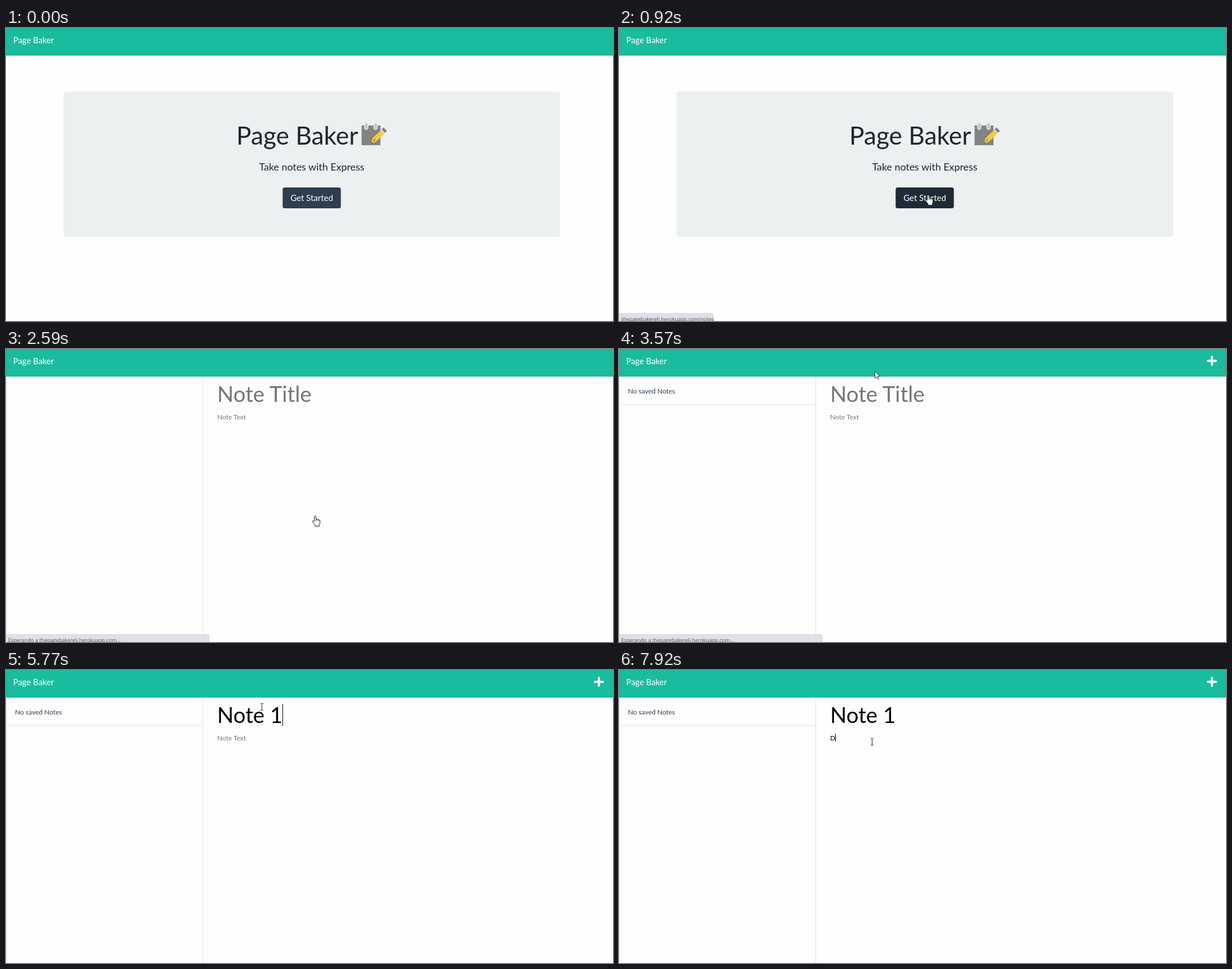
Write an HTML page that moves like this. It is 1078x520 px and loops after 7990 ms.

```html
<!DOCTYPE html>
<html lang="en">
<head>
<meta charset="utf-8">
<title>Page Baker</title>
<style>
html, body { margin: 0; width: 100%; height: 100%; overflow: hidden; background: #fefefe; }
svg { display: block; width: 100vw; height: 100vh; font-family: Lato, sans-serif; }
text { white-space: pre; }
#status text { font: 9.1px "Open Sans", "Noto Sans", sans-serif; }
</style>
</head>
<body>
<svg viewBox="0 0 1078 520" xmlns="http://www.w3.org/2000/svg">
  <rect width="1078" height="520" fill="#fefefe"/>
  <rect width="1078" height="49" fill="#1abc9e"/>
  <text x="12.800" y="27" font-size="14.800" fill="#fff">Page Baker</text>
  <path id="plus" d="M1053 14V28M1046 21H1060" stroke="#f3fbf9" stroke-width="4" stroke-linecap="round"/>

  <g id="home">
    <rect x="102" y="113" width="882" height="257.500" rx="4" fill="#ecf0f1"/>
    <text x="409" y="207" font-size="44.300" fill="#212529">Page Baker</text>
    <g id="pad">
      <rect x="631.500" y="173" width="33.500" height="35" fill="#838383"/>
      <g fill="#c4c9c2" stroke="#ecf0f1" stroke-width="1">
        <rect x="636.500" y="168.500" width="6.500" height="12" rx="3.200"/>
        <rect x="653" y="168.500" width="6.500" height="12" rx="3.200"/>
      </g>
      <path d="M648 205L651 195.500L666 181L672 187L657.500 201.500Z" fill="#fcc836"/>
      <path d="M667 180L670.500 176.500L676.500 182.500L673 186Z" fill="#7f8487"/>
      <path d="M652 200.800L655.500 197.300" stroke="#6d6440" stroke-width="1.200"/>
      <path d="M648 205L649 202L651 204Z" fill="#555"/>
    </g>
    <text x="543" y="253.300" font-size="17.850" fill="#212529" text-anchor="middle">Take notes with Express</text>
    <rect id="ring" x="490" y="282" width="106" height="39" rx="5" fill="none" stroke="#4c5b6a" stroke-opacity=".6"/>
    <rect id="button" x="491.300" y="283" width="103.400" height="37" rx="3.840"/>
    <text x="543" y="307" font-size="15" fill="#fff" text-anchor="middle">Get Started</text>
  </g>

  <g id="notes">
    <path d="M.5 49V520M349.500 49V520" stroke="#dfdfdf"/>
    <g id="list">
      <text x="16" y="79" font-size="12" fill="#2c3e50">No saved Notes</text>
      <path d="M2 98.500H348.500" stroke="#dfdfdf"/>
    </g>
    <text id="title" x="375" y="94" font-size="38.400"></text>
    <text id="body" x="375" y="125" font-size="12"></text>
    <rect id="caret" width="1"/>
  </g>

  <g id="status">
    <path id="bar" fill="#dee1e6" stroke="#cfd2d7" stroke-width=".6"/>
    <text id="link" x="4" y="519.500" fill="#4b4f54"></text>
  </g>

  <g id="arrow" fill="#fff" stroke="#000" stroke-width=".8">
    <path d="M.5 .5V13L3.400 10.300L5.300 14.600L7.300 13.700L5.400 9.500H9.400Z"/>
  </g>
  <g id="hand" fill="#fff" stroke="#111820" stroke-width="1" stroke-linejoin="round">
    <path d="M-1.500 8.500V.8Q-1.500 -.7 0 -.7T1.500 .8V5.600Q1.700 4.500 2.900 4.600T4.100 6Q4.500 5.200 5.500 5.300T6.600 6.700Q7 6 7.900 6.300T8.700 7.800V11Q8.700 13.500 7.200 15.200V17.400H-.2V15.500L-4 10.300Q-5.200 8.600 -4 7.900T-1.500 9.300"/>
    <path d="M1.500 5.600V8.500M4.100 6V8.500M6.600 6.700V8.700" fill="none" stroke-width=".8"/>
  </g>
  <path id="beam" d="M-2.500 -6H-.7L0 -5.500L.7 -6H2.500M0 -5.500V5.500M-2.500 6H-.7L0 5.500L.7 6H2.500" fill="none" stroke="#222" stroke-width="1"/>
</svg>
<script>
const LOOP = 7990;
const $ = id => document.getElementById(id);
const show = (id, on) => $(id).setAttribute('visibility', on ? 'visible' : 'hidden');
const set = (id, attrs) => { for (const k in attrs) $(id).setAttribute(k, attrs[k]); };
const ramp = (t, from, length) => Math.min(1, Math.max(0, (t - from) / length));
const within = (t, from, to) => t >= from && t < to;
const latest = (list, t) => list.filter(item => item[0] <= t).pop();

// time, pointer shape, hot spot
const pointer = [
  [0, ''], [70, 'arrow', 945, 482], [160, 'arrow', 800, 415], [250, 'arrow', 713, 363],
  [520, 'arrow', 692, 356], [590, 'arrow', 648, 337], [650, 'arrow', 606, 320],
  [720, 'hand', 573, 308], [790, 'hand', 556, 300], [850, 'hand', 549, 297],
  [3170, 'arrow', 498, 190], [3240, 'arrow', 464, 82], [3310, 'arrow', 454, 39],
  [3640, 'arrow', 454, 42], [3710, 'arrow', 454, 46], [3780, 'beam', 454.5, 56],
  [3840, 'beam', 454.5, 62], [3910, 'beam', 454.5, 65.5],
  [6620, 'beam', 454.5, 69], [6700, 'beam', 453.5, 82], [6770, 'beam', 452.5, 99],
  [6840, 'beam', 450.5, 114], [6910, 'beam', 449.5, 123], [6980, 'beam', 449.5, 127.5]
];
const titles = [[0, ''], [4990, 'N'], [5210, 'No'], [5480, 'Not'], [5550, 'Note'], [5620, 'Note '], [5770, 'Note 1']];
const host = 'thepagebakereli.herokuapp.com';
const statuses = [[0, ''], [850, host + '/notes', 168], [1700, 'Esperando a ' + host + '...', 361], [3640, '']];

function field(id, value, hint) {
  $(id).textContent = value || hint;
  set(id, { fill: value ? '#000' : '#757575' });
  return 375 + (value ? $(id).getComputedTextLength() : 0);
}

function draw(t) {
  const onNotes = t >= 2590;
  show('home', !onNotes);
  show('notes', onNotes);
  show('list', t >= 3170);
  show('plus', t >= 2770);

  const dark = ramp(t, 700, 150);
  const mix = (a, b) => Math.round(a + (b - a) * dark);
  set('button', { fill: `rgb(${mix(44, 30)},${mix(62, 43)},${mix(80, 55)})` });
  set('ring', { 'stroke-width': 3 * ramp(t, 1500, 150) });

  const titleEnd = field('title', latest(titles, t)[1], 'Note Title');
  const bodyEnd = field('body', t >= 7920 ? 'D' : '', 'Note Text');
  const inBody = t >= 7120;
  const lit = within(t, 4020, 4520) || within(t, 4990, 6290) || within(t, 6790, 7640) || t >= 7920;
  show('caret', lit);
  set('caret', {
    x: Math.floor(inBody ? bodyEnd : titleEnd), y: inBody ? 113 : 60, height: inBody ? 14 : 39
  });

  const [, message, width] = latest(statuses, t);
  show('status', message);
  if (message) {
    $('link').textContent = message;
    set('bar', { d: `M-2 522V506.500H${width - 4}Q${width} 506.500 ${width} 510.500V522Z` });
  }

  const [, shape, x, y] = latest(pointer, t);
  for (const id of ['arrow', 'hand', 'beam']) {
    show(id, id === shape);
    if (id === shape) set(id, { transform: `translate(${x} ${y})` });
  }
}

const start = performance.now();
function tick() {
  draw((performance.now() - start) % LOOP);
  requestAnimationFrame(tick);
}
draw(0);
requestAnimationFrame(tick);
</script>
</body>
</html>
```
